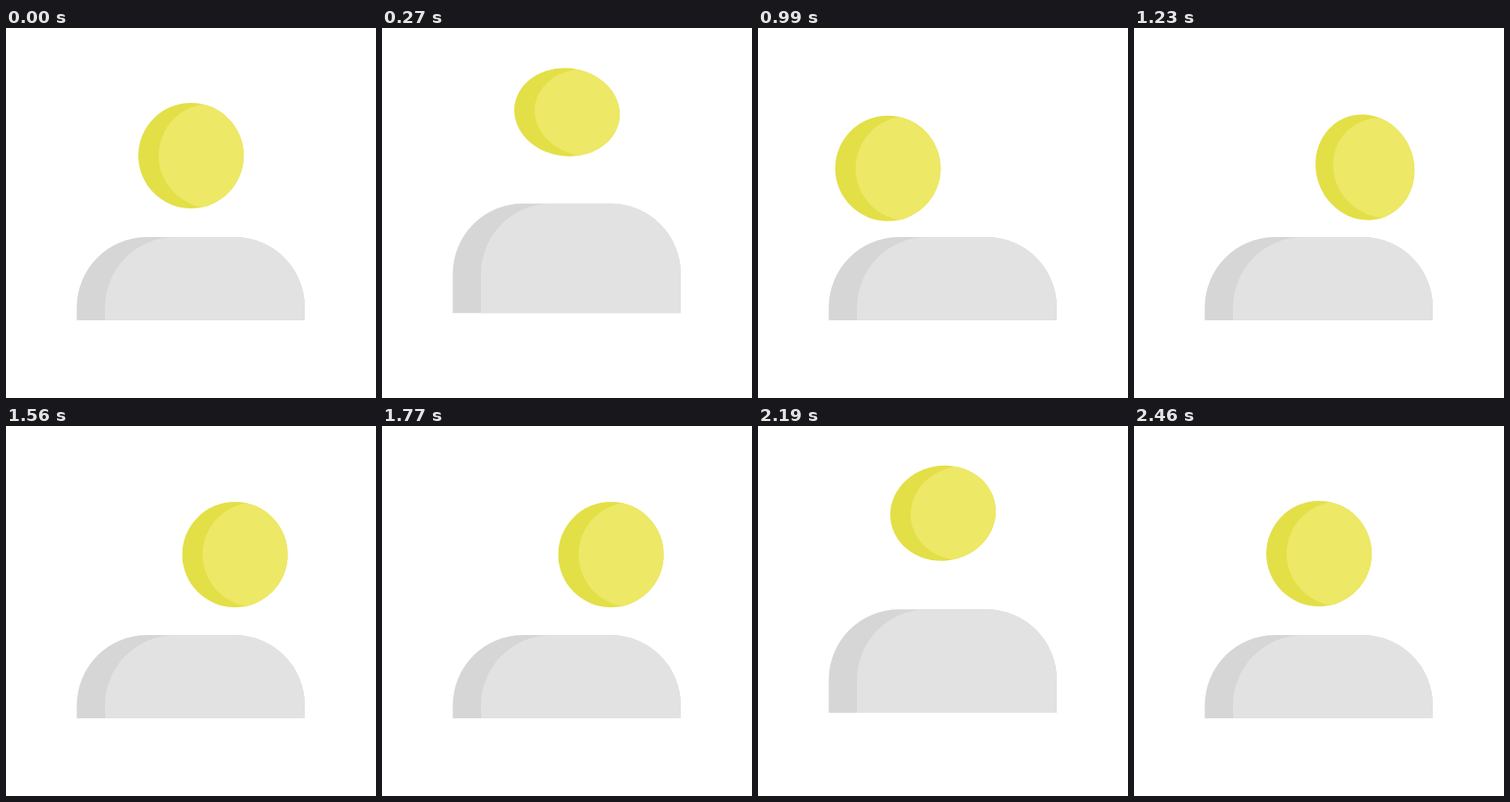
These frames come from a looping animation (400x400 px, 4520 ms). An HTML page with a canvas:

```html
<!DOCTYPE html>
<html lang="en">
<head>
<meta charset="utf-8">
<title>Bouncing figure</title>
<style>
  html, body { margin: 0; width: 100%; height: 100%; overflow: hidden; background: #fff; }
  canvas { display: block; width: 400px; height: 400px; }
</style>
</head>
<body>
<canvas id="stage" width="400" height="400"></canvas>
<script>
const ctx = document.getElementById('stage').getContext('2d');
const LOOP = 4520, STEP = 30, R = 57;

const progress = (t, from, to) => Math.min(1, Math.max(0, (t - from) / (to - from)));

// Smooth step from 0 to 1.
function ease(t, from, to) {
  const p = progress(t, from, to);
  return p * p * (3 - 2 * p);
}

// Smooth rise to 1 halfway and back to 0.
const bump = (t, from, to) => Math.sin(Math.PI * progress(t, from, to)) ** 2;

// A short crouch, then a jump.
const hop = (t, crouch, jump, land) => bump(t, jump, land) - 0.1 * bump(t, crouch, jump);

function pose(t) {
  const hopOut = hop(t, 0, 120, 450);
  const hopBack = hop(t, 1560, 1770, 2400);
  const lift = hopOut + hopBack;
  const leanLeft = bump(t, 480, 720);
  const leanRight = bump(t, 1050, 1350);

  const x = 200
    - 59.5 * ease(t, 420, 600) - 6.5 * bump(t, 540, 720)
    - 5 * bump(t, 930, 1020)
    + 107 * ease(t, 960, 1230) + 2.2 * bump(t, 1110, 1350)
    - 47.5 * ease(t, 1770, 1980);

  const y = 138
    + 12 * ease(t, 330, 540)
    + 7 * bump(t, 930, 1290) - 11 * ease(t, 1200, 1350)
    - ease(t, 1770, 2400)
    - 47 * (1 - (1 - lift) ** 2);

  return {
    x, y, lift,
    sx: 1 - 0.105 * leanLeft - 0.068 * leanRight,
    sy: 1 - 0.17 * lift * lift,
    skew: 0.022 * (hopOut - hopBack + leanLeft) + 0.032 * leanRight
  };
}

function fillBody(left, top, bottom, color) {
  const right = 323, r = 76;
  ctx.beginPath();
  ctx.moveTo(left, bottom);
  ctx.arc(left + r, top + r, r, Math.PI, Math.PI * 1.5);
  ctx.arc(right - r, top + r, r, -Math.PI / 2, 0);
  ctx.lineTo(right, bottom);
  ctx.fillStyle = color;
  ctx.fill();
}

function fillOval(x, rx, ry, color) {
  ctx.beginPath();
  ctx.ellipse(x, 0, rx, ry, 0, 0, Math.PI * 2);
  ctx.fillStyle = color;
  ctx.fill();
}

function drawHead({ x, y, sx, sy, skew }) {
  const squeeze = (1 - sx) / 0.105;
  ctx.save();
  ctx.transform(sx, skew, skew, sy, x, y);
  fillOval(0, R, R, '#e3df47');
  ctx.clip();
  fillOval(22 - 3 * squeeze, R, 56.5 - 4.5 * squeeze, '#ede866');
  ctx.restore();
}

function draw(t) {
  const p = pose(t);
  const top = 226 - 37 * p.lift, bottom = Math.min(316, 316 - 8 * p.lift);
  ctx.fillStyle = '#fff';
  ctx.fillRect(0, 0, 400, 400);
  fillBody(76.5, top, bottom, '#d6d6d6');
  fillBody(107, top, bottom, '#e2e2e2');
  drawHead(p);
}

const start = performance.now();
function tick() {
  const t = (performance.now() - start) % LOOP;
  draw(Math.floor(t / STEP) * STEP);
  requestAnimationFrame(tick);
}
tick();
</script>
</body>
</html>
```
